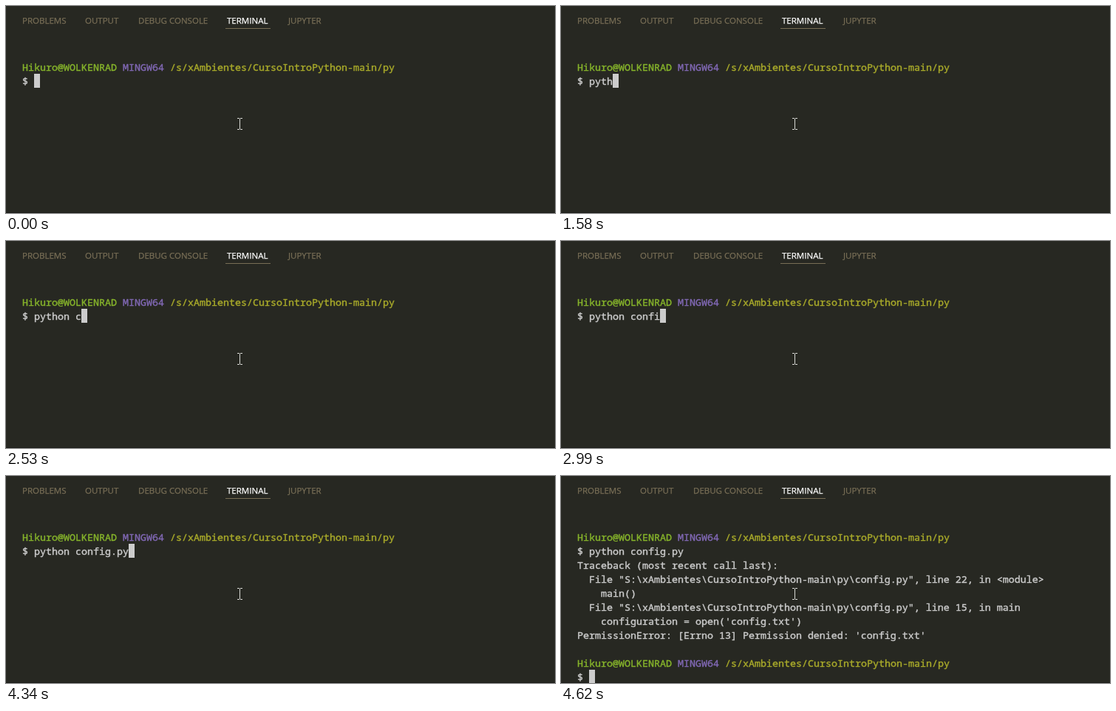
Recreate the animation shown at these times as an HTML page with a canvas. Size 743 by 281 pixels, loop 7.88 s.

```html
<!DOCTYPE html>
<html lang="en">
<head>
<meta charset="utf-8">
<title>Terminal</title>
<style>
  html, body { margin: 0; width: 100%; height: 100%; overflow: hidden; background: #272822; }
  canvas { display: block; }
</style>
</head>
<body>
<canvas id="stage" width="743" height="281"></canvas>
<script>
const ctx = document.getElementById('stage').getContext('2d');
const LOOP = 7880;
const CELL = 8, LINE = 19, LEFT = 22, TOP = 73, ASCENT = 15;
const MONO = '13.333px "Noto Sans Mono", monospace';
const TAB_FONT = '11.5px "Open Sans", sans-serif';
const COLOR = {
  back: '#272822', text: '#cccccc', green: '#86b42b', yellow: '#a9aa2a',
  purple: '#8068b4', muted: '#786e56', active: '#ffffff', edge: '#1b1c18'
};

const TABS = [['PROBLEMS', 22], ['OUTPUT', 107], ['DEBUG CONSOLE', 179], ['TERMINAL', 299], ['JUPYTER', 382]];
const USER = 'Hikuro@WOLKENRAD';
const FOLDER = '/s/xAmbientes/CursoIntroPython-main/py';
const SCRIPT = 'S:\\xAmbientes\\CursoIntroPython-main\\py\\config.py';
const COMMAND = 'python config.py';
const OUTPUT = [
  'Traceback (most recent call last):',
  `  File "${SCRIPT}", line 22, in <module>`,
  '    main()',
  `  File "${SCRIPT}", line 15, in main`,
  "    configuration = open('config.txt')",
  "PermissionError: [Errno 13] Permission denied: 'config.txt'"
];

// One time per typed character, then the moments after Enter.
const KEYS = [1050, 1380, 1480, 1580, 1720, 1860, 2260, 2530, 2660, 2730, 2920, 2990, 3130, 3720, 4140, 4340];
const ENTER = 4410, FIRST_LINE = 4480, ALL_LINES = 4550, NEW_PROMPT = 4620;

// A thin outline gives the strokes a medium weight.
function label(text, x, y, font, color, outline) {
  ctx.font = font;
  ctx.fillStyle = ctx.strokeStyle = color;
  ctx.lineWidth = outline;
  ctx.lineJoin = 'round';
  ctx.fillText(text, x, y);
  ctx.strokeText(text, x, y);
}

function write(text, col, row, color = COLOR.text) {
  label(text, LEFT + col * CELL, TOP + row * LINE + ASCENT, MONO, color, 0.4);
}

function cursor(col, row) {
  ctx.fillStyle = COLOR.text;
  ctx.fillRect(LEFT + col * CELL, TOP + row * LINE, CELL, LINE);
}

function prompt(row) {
  write(USER, 0, row, COLOR.green);
  write('MINGW64', 17, row, COLOR.purple);
  write(FOLDER, 25, row, COLOR.yellow);
  write('$', 0, row + 1);
}

function panel() {
  ctx.fillStyle = COLOR.back;
  ctx.fillRect(0, 0, 743, 281);
  ctx.fillStyle = COLOR.edge;
  ctx.fillRect(0, 280, 743, 1);
  for (const [name, x] of TABS) {
    label(name, x, 24, TAB_FONT, name === 'TERMINAL' ? COLOR.active : COLOR.muted, 0.25);
  }
  ctx.fillStyle = COLOR.muted;
  ctx.fillRect(297, 30, 61, 1);
}

function pointer() {
  ctx.fillStyle = '#d8d8d4';
  ctx.fillRect(316, 153, 1, 14);
  for (const y of [152, 167]) {
    ctx.fillRect(313, y, 3, 1);
    ctx.fillRect(317, y, 3, 1);
  }
}

function terminal(t) {
  const typed = KEYS.filter(time => time <= t).length;
  prompt(0);
  write(COMMAND.slice(0, typed), 2, 1);
  if (t < ENTER) return cursor(2 + typed, 1);

  const shown = t < FIRST_LINE ? 0 : t < ALL_LINES ? 1 : OUTPUT.length;
  OUTPUT.slice(0, shown).forEach((line, i) => write(line, 0, 2 + i));
  if (t < NEW_PROMPT) return cursor(0, 2 + shown);

  prompt(9);
  cursor(2, 10);
}

function frame(now) {
  panel();
  terminal((now - start) % LOOP);
  pointer();
  requestAnimationFrame(() => frame(performance.now()));
}

const start = performance.now();
frame(start);
</script>
</body>
</html>
```
